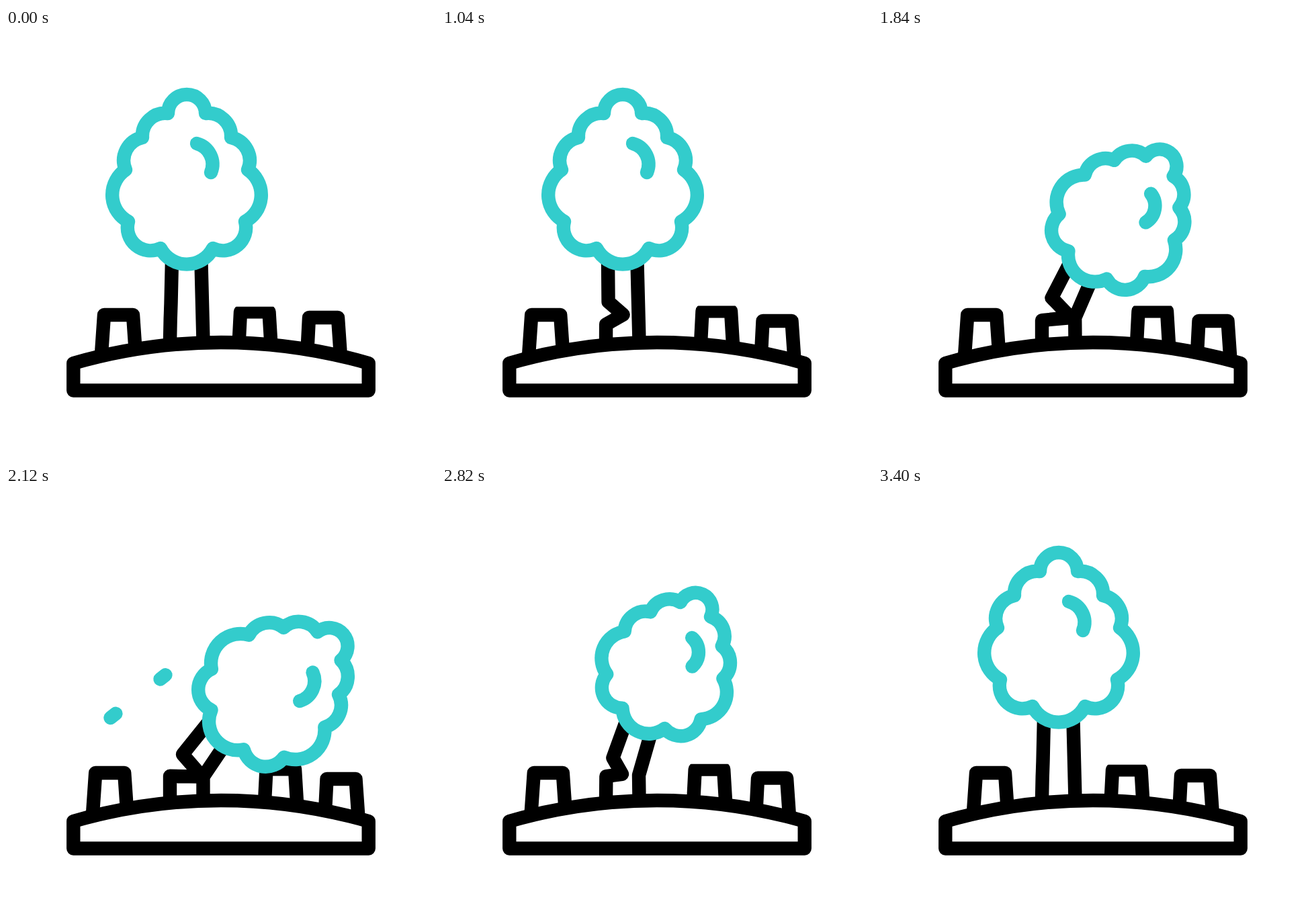
An HTML page for the animation above (3.6 s loop, 640 by 640 pixels).

```html
<!DOCTYPE html>
<html lang="en">
<head>
<meta charset="utf-8">
<title>Falling tree</title>
<style>
  html, body { margin: 0; width: 100%; height: 100%; overflow: hidden; background: #fff; }
  svg { display: block; width: 100vw; height: 100vh; }
  path { fill: none; stroke: #000; stroke-width: 20.4; stroke-linecap: round; stroke-linejoin: round; }
  #ground, #leaves { fill: #fff; }
  .teal, .teal path { stroke: #3cc; }
  #crown path { stroke-width: inherit; }
</style>
</head>
<body>
<svg viewBox="0 0 640 640">
  <defs>
    <clipPath id="flat"><rect x="-30" y="-7.7" width="110" height="90"/></clipPath>
  </defs>
  <g class="stump"><path d="M-4 58L0 0H43L47 58"/></g>
  <g class="stump"><path d="M-3 58L0 0H42.5L46 58" clip-path="url(#flat)"/></g>
  <g class="stump"><path d="M-3 58L0 0H43L47 58"/></g>
  <path id="left"/>
  <path id="right"/>
  <path id="ground" d="M100.300 499A792.600 792.600 0 0 1 539.700 499V539.500H100.300Z"/>
  <path class="teal trail"/>
  <path class="teal trail"/>
  <g id="crown" class="teal">
    <g transform="translate(-284 -172)">
      <path id="leaves" d="M241 127A28 28 0 0 1 297 127A34 34 0 0 1 335 163A35 35 0 0 1 360 211
        A45 45 0 0 1 356 288A34.400 34.400 0 0 1 308 328A44 44 0 0 1 230 328A34.400 34.400 0 0 1 182 288
        A45 45 0 0 1 178 211A35 35 0 0 1 203 163A34 34 0 0 1 241 127Z"/>
      <path d="M284 172A32 32 0 0 1 305 215"/>
    </g>
  </g>
</svg>
<script>
  const LOOP = 3600, TURN = 2290, TILT = 53.5 * Math.PI / 180;
  const $ = s => document.querySelector(s), $$ = s => [...document.querySelectorAll(s)];
  const stumps = $$('.stump'), trails = $$('.trail');
  const crown = $('#crown'), left = $('#left'), right = $('#right');

  const ramp = (t, a, b) => Math.min(1, Math.max(0, (t - a) / (b - a)));
  const ease = (t, a, b) => { const x = ramp(t, a, b); return x * x * (3 - 2 * x); };
  const mix = (p, q, k) => p.map((pt, i) => pt.map((v, j) => v + (q[i][j] - v) * k));
  const line = pts => 'M' + pts.map(p => p.join(' ')).join('L');

  // x, y, dx, dy of each stump
  const stumpPaths = [[146, 427, -12.8, 0], [349, 422.4, 38.5, -1.2], [451, 431, 26.5, 5]];

  // trunk sides from the top down: whole, notched and fallen
  const whole = [[247, 345], [245.5, 410], [245, 425], [244.7, 433], [244, 466]];
  const notched = [[247, 345], [248, 407], [275, 427], [244, 443], [244, 466]];
  const fallen = [[305, 352], [264, 399], [293, 433], [244, 431], [244, 466]];
  const rightUp = [[290.5, 350], [292.5, 428], [293.5, 466]];
  const rightDown = [[337, 374], [293.5, 433], [293.5, 466]];

  const trailStarts = [[155.5, 345], [229.5, 287.5]];

  function draw(t) {
    const apart = ease(t, 220, 860) - ease(t, 2510, 3400);
    stumps.forEach((s, i) => {
      const [x, y, dx, dy] = stumpPaths[i];
      s.setAttribute('transform', `translate(${x + dx * apart} ${y + dy * apart})`);
    });

    const cut = t < TURN ? ease(t, 800, 1130) : 0;
    const fall = Math.min(ease(t, 1120, 2300), 1 - ramp(t, 2286, 3313));
    left.setAttribute('d', line(mix(mix(whole, notched, cut), fallen, fall)));
    right.setAttribute('d', line(mix(rightUp, rightDown, fall)));

    // points travel straight, so the crown shrinks a little midway while its line keeps its weight
    const a = 1 + fall * (Math.cos(TILT) - 1), b = fall * Math.sin(TILT);
    crown.setAttribute('transform', `matrix(${a} ${b} ${-b} ${a} ${284 + 184 * fall} ${172 + 112.5 * fall})`);
    crown.style.strokeWidth = 20.4 / Math.hypot(a, b);

    const length = 44 * Math.min(ramp(t, 2080, 2260), 1 - ramp(t, 2260, 2428));
    trails.forEach((p, i) => {
      const [x, y] = trailStarts[i];
      p.setAttribute('d', length > 0 ? line([[x, y], [x + 0.79 * length, y - 0.62 * length]]) : '');
    });
  }

  const start = performance.now();
  function tick() {
    draw((performance.now() - start) % LOOP);
    requestAnimationFrame(tick);
  }
  tick();
</script>
</body>
</html>
```
